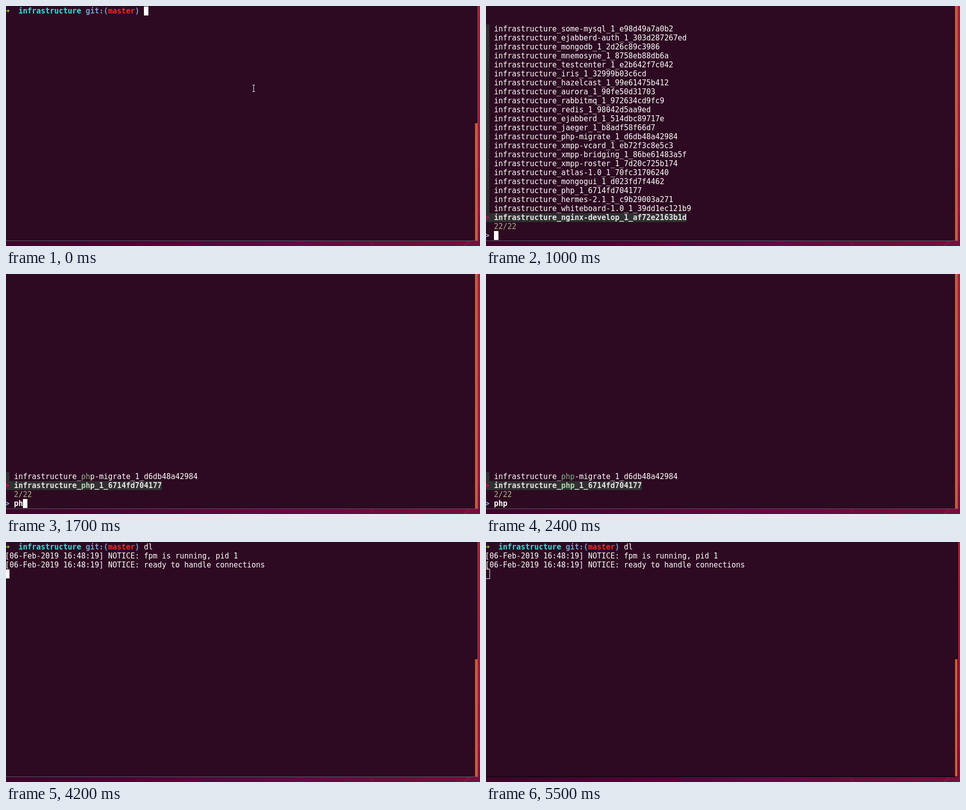
Animation of 952 by 481 pixels, one loop 5900 ms. Source, as an HTML page with a canvas:

```html
<!DOCTYPE html>
<html lang="en">
<head>
<meta charset="utf-8">
<title>Container log picker</title>
<style>
  html, body { margin: 0; width: 100%; height: 100%; overflow: hidden; background: #2d0a21; }
  canvas { display: block; width: 952px; height: 481px; }
</style>
</head>
<body>
<canvas id="stage" width="952" height="481"></canvas>
<script>
const ctx = document.getElementById('stage').getContext('2d', { alpha: false });
const LOOP = 5900;
const CELL = { w: 9, h: 18, left: -2, top: 1, ascent: 14 };
const LIST_BOTTOM = 23;
const COLOR = {
  back: '#2d0a21', text: '#ffffff', scroll: '#cb5b39',
  green: '#8ae234', cyan: '#34e2e2', blue: '#729fcf', red: '#ef2929',
  panel: '#303030', current: '#e4e4e4', pointer: '#d7005f', prompt: '#87afd7',
  info: '#afaf87', match: '#87af87', currentMatch: '#afd7af'
};

const containers = `some-mysql_1_e98d49a7a0b2
ejabberd-auth_1_303d287267ed
mongodb_1_2d26c89c3986
mnemosyne_1_8758eb88db6a
testcenter_1_e2b642f7c042
iris_1_32999b03c6cd
hazelcast_1_99e61475b412
aurora_1_90fe50d31703
rabbitmq_1_972634cd9fc9
redis_1_98042d5aa9ed
ejabberd_1_514dbc89717e
jaeger_1_b8adf58f66d7
php-migrate_1_d6db48a42984
xmpp-vcard_1_eb72f3c8e5c3
xmpp-bridging_1_86be61483a5f
xmpp-roster_1_7d20c725b174
atlas-1.0_1_70fc31706240
mongogui_1_d023fd7f4462
php_1_6714fd704177
hermes-2.1_1_c9b29003a271
whiteboard-1.0_1_39dd1ec121b9
nginx-develop_1_af72e2163b1d`.split('\n').map(name => 'infrastructure_' + name);

const pick = (...rows) => rows.map(i => containers[i]);
const results = {
  '': containers,
  p: pick(14, 21, 15, 13, 12, 18),
  ph: pick(12, 18),
  php: pick(12, 18)
};

const cellX = col => CELL.left + col * CELL.w;
const cellY = row => CELL.top + row * CELL.h;

function fill(color, x, y, w, h) {
  ctx.fillStyle = color;
  ctx.fillRect(x, y, w, h);
}

function print(text, col, row, color = COLOR.text, bold = false) {
  ctx.font = `${bold ? 'bold ' : ''}15px "DejaVu Sans Mono", monospace`;
  ctx.fillStyle = color;
  [...text].forEach((ch, i) => ctx.fillText(ch, cellX(col + i), cellY(row) + CELL.ascent));
}

function cursor(col, row) {
  fill(COLOR.text, cellX(col), cellY(row), CELL.w, CELL.h);
}

function hollowCursor(col, row) {
  ctx.strokeStyle = COLOR.text;
  ctx.lineWidth = 1;
  ctx.strokeRect(cellX(col) - 0.5, cellY(row) - 0.5, CELL.w + 1, CELL.h + 1);
}

function line(color, x1, y1, x2, y2, width) {
  ctx.strokeStyle = color;
  ctx.lineWidth = width;
  ctx.beginPath();
  ctx.moveTo(x1, y1);
  ctx.lineTo(x2, y2);
  ctx.stroke();
}

function gradient(x, y, stops) {
  const g = ctx.createLinearGradient(0, 0, x, y);
  stops.forEach(([at, color]) => g.addColorStop(at, color));
  return g;
}

const bottomWall = gradient(952, 0, [
  [0, '#3a0529'], [0.35, '#550337'], [0.6, '#6b0442'], [0.8, '#6f0a3b'], [1, '#7a0d3b']
]);
const sideWall = gradient(0, 481, [
  [0, '#a91d36'], [0.45, '#a2173b'], [0.83, '#980f40'], [0.84, '#a50d47'], [0.9, '#900b42'], [1, '#7a0d3b']
]);

function drawWindow(scrollTop, fade) {
  fill(COLOR.back, 0, 0, 952, 481);
  fill(bottomWall, 0, 471, 952, 10);
  line('#7f1040', 730, 471, 740, 481, 2);
  line('#85163f', 931, 471, 919, 481, 3);
  fill(sideWall, 948, 0, 4, 481);
  fill(COLOR.scroll, 942, scrollTop, 5, 470 - scrollTop);
  const shade = [92, 90, 101].map(v => Math.round(v * (1 - fade)));
  const border = `rgb(${shade})`;
  fill(border, 0, 470, 948, 1);
  fill(border, 947, 0, 1, 471);
}

function drawPrompt(command) {
  print('➜', 0, 0, COLOR.green, true);
  print('infrastructure', 3, 0, COLOR.cyan, true);
  print('git:(', 18, 0, COLOR.blue, true);
  print('master', 23, 0, COLOR.red, true);
  print(')', 29, 0, COLOR.blue, true);
  print(command, 31, 0);
}

function drawPointer() {
  line(COLOR.text, 497.5, 159, 497.5, 171, 1);
  for (const y of [158, 171]) fill(COLOR.text, 495, y, 5, 1);
}

function drawItem(name, row, query, selected) {
  fill(COLOR.panel, 0, cellY(row), selected ? cellX(name.length + 2) : 7, CELL.h);
  if (selected) print('>', 0, row, COLOR.pointer, true);
  print(name, 2, row, selected ? COLOR.current : COLOR.text, selected);
  if (!query) return;
  const at = name.indexOf(query);
  fill(selected ? COLOR.panel : COLOR.back, cellX(at + 2), cellY(row), query.length * CELL.w, CELL.h);
  print(query, at + 2, row, selected ? COLOR.currentMatch : COLOR.match, selected);
}

function drawFinder(query, blinkOn) {
  const found = results[query];
  found.forEach((name, i) => {
    const row = LIST_BOTTOM - found.length + 1 + i;
    drawItem(name, row, query, row === LIST_BOTTOM);
  });
  print(`${found.length}/${containers.length}`, 2, 24, COLOR.info);
  print('>', 0, 25, COLOR.prompt, true);
  print(query, 2, 25, COLOR.text, true);
  if (blinkOn) cursor(query.length + 2, 25);
}

function drawLog(t) {
  drawPrompt('dl');
  const stamp = '[06-Feb-2019 16:48:19] NOTICE: ';
  ['fpm is running, pid 1', 'ready to handle connections']
    .forEach((message, i) => print(stamp + message, 0, i + 1));
  if (t >= 5100) hollowCursor(0, 3);
  else if (t < 3700 || (t >= 4200 && t < 4900)) cursor(0, 3);
}

function drawTyping(t) {
  const command = t < 500 ? '' : t < 600 ? 'd' : 'dl';
  drawPrompt(command);
  if (t < 900) cursor(31 + command.length, 0);
  else cursor(0, 1);
  if (t < 500) drawPointer();
}

function render(t) {
  const finding = t >= 1000 && t < 3100;
  const fade = t < 5100 ? 0 : Math.min(5, Math.floor((t - 5000) / 100)) / 5;
  drawWindow(finding ? 0 : 235, fade);
  if (finding) {
    const query = t < 1500 ? '' : t < 1700 ? 'p' : t < 1800 ? 'ph' : 'php';
    drawFinder(query, t < 2400);
  } else if (t < 1000) drawTyping(t);
  else drawLog(t);
}

const start = performance.now();
function tick() {
  render((performance.now() - start) % LOOP);
  requestAnimationFrame(tick);
}
tick();
</script>
</body>
</html>
```
